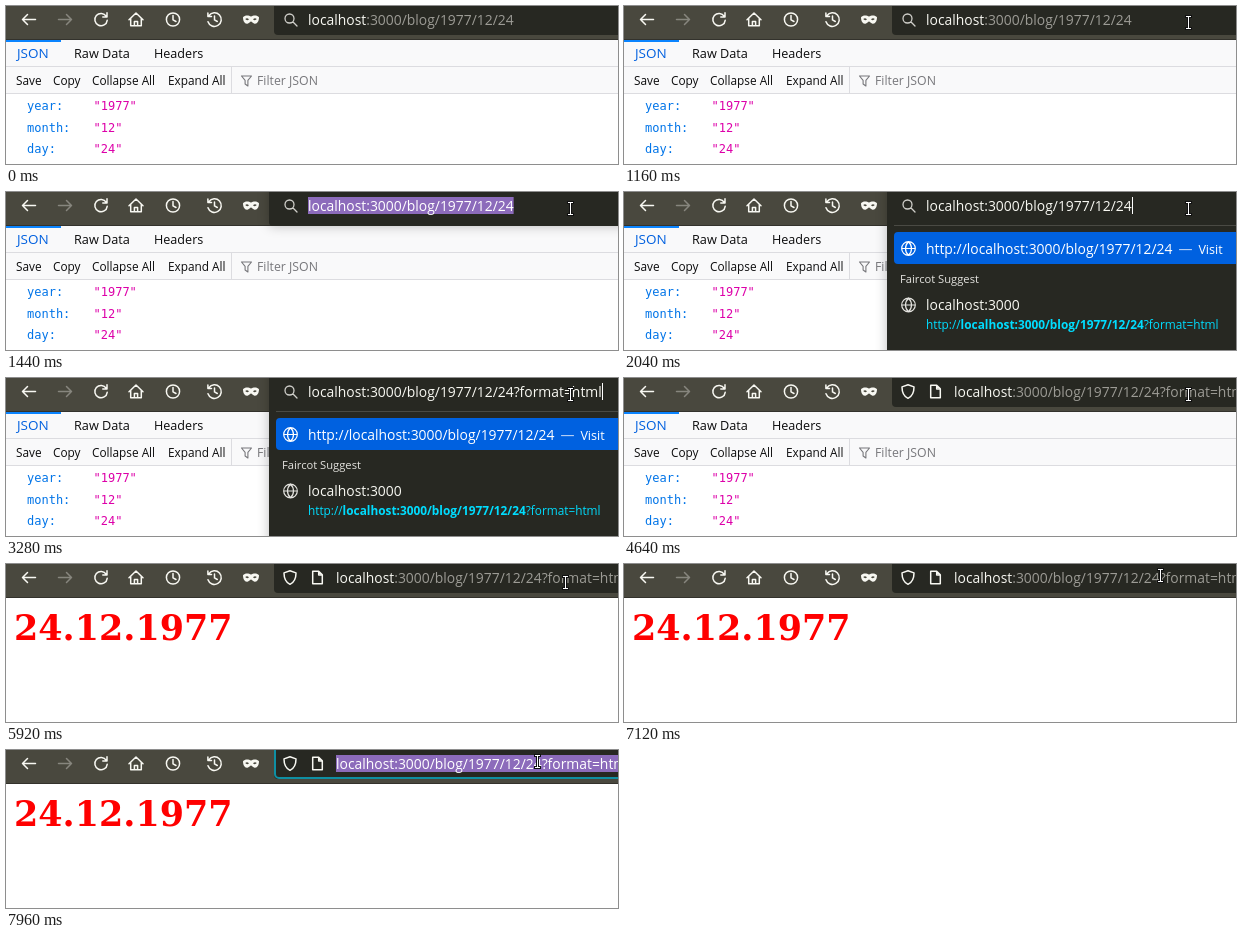
Animation of 612x158 px, one loop 8000 ms. Source, as an HTML page with a canvas:

```html
<!DOCTYPE html>
<html lang="en">
<head>
<meta charset="utf-8">
<title>Blog date route</title>
<style>
html, body { margin: 0; width: 100%; height: 100%; overflow: hidden; background: #fff; }
canvas { display: block; width: 612px; height: 158px; }
</style>
</head>
<body>
<canvas id="stage" width="612" height="158"></canvas>
<script>
const W = 612, H = 158, LOOP = 8000, STEP = 40;
const ctx = document.getElementById('stage').getContext('2d');
const UI = '"Open Sans", "Noto Sans", sans-serif';
const MONO = '"DejaVu Sans Mono", monospace';
const SERIF = '"DejaVu Serif", serif';
const BAR = '#49483e', FIELD = '#272822', EDGE = '#4a4a44';
const LIGHT = '#f8f8f2', DIM = '#9c9b95', INK = '#0c0c0d';
const BLUE = '#0061e0', CYAN = '#00ddff', PURPLE = '#8c6bbb';
const HOST = 'localhost', PATH = ':3000/blog/1977/12/24', QUERY = '?format=html';
const URL_SIZE = 13.9, URL_BASE = 19;

function rect(x, y, w, h, color) {
  ctx.fillStyle = color;
  ctx.fillRect(x, y, w, h);
}

function roundRect(x, y, w, h, r, color) {
  ctx.beginPath();
  ctx.roundRect(x, y, w, h, r);
  ctx.fillStyle = color;
  ctx.fill();
}

// Draws text and returns the x where it ends.
function text(str, x, y, size, color, family = UI, weight = 400) {
  ctx.font = `${weight} ${size}px ${family}`;
  ctx.fillStyle = color;
  ctx.fillText(str, x, y);
  return x + ctx.measureText(str).width;
}

function width(str) {
  ctx.font = `400 ${URL_SIZE}px ${UI}`;
  return ctx.measureText(str).width;
}

function icon(d, x, y, color = LIGHT, line = 1.5, fill = false) {
  const p = new Path2D(d);
  ctx.save();
  ctx.translate(x, y);
  ctx.lineCap = ctx.lineJoin = 'round';
  if (fill) {
    ctx.fillStyle = color;
    ctx.fill(p, 'evenodd');
  } else {
    ctx.strokeStyle = color;
    ctx.lineWidth = line;
    ctx.stroke(p);
  }
  ctx.restore();
}

const ring = r => `M${r} 0A${r} ${r} 0 1 1 ${-r} 0A${r} ${r} 0 1 1 ${r} 0`;
const BACK = 'M6.5 0H-6.5M-1.5 -5L-6.5 0L-1.5 5';
const NEXT = 'M-6.5 0H6.5M1.5 -5L6.5 0L1.5 5';
const RELOAD = 'M5.3 -3.2A6.2 6.2 0 1 0 6.2 .8M6 -6.8V-2.6H1.8';
const HOME = 'M-7 .3L0 -6.5L7 .3M-5.3 -1V6.3H5.3V-1M-1.6 6V2H1.6V6';
const CLOCK = ring(6.6) + 'M0 -4V.3L3 2';
const FORGET = 'M-5.6 -3.8A6.8 6.8 0 1 1 -6.5 2.2M-6.6 -6.6V-3H-3M0 -3.6V.4L2.8 2';
const MASK = 'M-8 -2.2C-6 -5 -2 -4.2 0 -3C2 -4.2 6 -5 8 -2.2C8 2 6 5 3 4C1 3.2 1 2 0 2C-1 2 -1 3.2 -3 4C-6 5 -8 2 -8 -2.2Z' +
  'M-5.8 -.4Q-4 -2.4 -2 -.2Q-4 1.6 -5.8 -.4ZM5.8 -.4Q4 -2.4 2 -.2Q4 1.6 5.8 -.4Z';
const LENS = 'M3 -1.5A4.5 4.5 0 1 1 -6 -1.5A4.5 4.5 0 1 1 3 -1.5M1.8 1.8L6 6';
const SHIELD = 'M0 -6.7L6 -4.6C6 1 4.5 4.6 0 6.8C-4.5 4.6 -6 1 -6 -4.6Z';
const PAGE = 'M-4.8 -6.2H1.2L4.8 -2.6V6.2H-4.8ZM1.2 -6V-2.6H4.6';
const GLOBE = ring(6.8) + 'M-6.8 0H6.8M0 -6.8C-4 -3 -4 3 0 6.8M0 -6.8C4 -3 4 3 0 6.8';
const FUNNEL = 'M-5 -5H5L1.4 -.6V5L-1.4 3V-.6Z';
const TABS = 'M-6.5 -5.5H6.5Q7.5 -5.5 7.5 -4.5V4.5Q7.5 5.5 6.5 5.5H-6.5Q-7.5 5.5 -7.5 4.5V-4.5Q-7.5 -5.5 -6.5 -5.5Z';
const STAR = Array.from({ length: 10 }, (_, i) => {
  const a = i * Math.PI / 5 - Math.PI / 2, r = i % 2 ? 3.7 : 8;
  return `${i ? 'L' : 'M'}${r * Math.cos(a)} ${r * Math.sin(a)}`;
}).join('') + 'Z';

function jsonPage() {
  rect(0, 34, W, 54, '#f9f9fa');
  rect(0, 34, 55, 2, '#0a84ff');
  rect(0, 60, W, 1, '#dcdce0');
  rect(0, 87, W, 1, '#dcdce0');
  text('JSON', 11, 52, 13.5, '#0060df');
  text('Raw Data', 68, 52, 12.7, INK);
  text('Headers', 148, 52, 12.6, INK);
  const tools = [['Save', 10], ['Copy', 47], ['Collapse All', 86], ['Expand All', 162]];
  for (const [label, x] of tools) text(label, x, 79, 11.8, INK);
  rect(225, 61, 1, 26, '#dcdce0');
  icon(FUNNEL, 240.5, 75, '#77777b', 1.1);
  text('Filter JSON', 251, 79, 12.3, '#77777b');
  const rows = [['year:', '"1977"'], ['month:', '"12"'], ['day:', '"24"']];
  rows.forEach(([key, value], i) => {
    const y = Math.round(104 + i * 21.5);
    text(key, 21, y, 12, '#0074e8', MONO);
    text(value, 87.5, y, 12, '#dd00a9', MONO);
  });
}

function toolbar() {
  rect(0, 0, W, 34, BAR);
  rect(0, 33, W, 1, '#33322c');
  icon(BACK, 23, 13.5);
  icon(NEXT, 59, 13.5, '#87867e');
  icon(RELOAD, 95, 13.5);
  icon(HOME, 130, 13.5);
  icon(CLOCK, 167, 13.5);
  icon(FORGET, 208.5, 13.5);
  icon(MASK, 245, 13.5, LIGHT, 1, true);
}

function selection(x, str) {
  rect(x, 5, width(str), 17, PURPLE);
  text(str, x, URL_BASE, URL_SIZE, '#fff');
}

function closedField(loaded, focused) {
  roundRect(268, -6, 360, 35, 4, FIELD);
  if (focused) {
    ctx.beginPath();
    ctx.roundRect(269, -6, 360, 34, 4);
    ctx.strokeStyle = '#0f8fa3';
    ctx.lineWidth = 2;
    ctx.stroke();
  }
  let x = 302;
  if (loaded) {
    icon(SHIELD, 284, 13.5);
    icon(PAGE, 311.5, 13.5);
    x = 330;
  } else {
    icon(LENS, 285, 14, '#d0cfca', 1.3);
  }
  if (focused) return selection(x, HOST + PATH + QUERY);
  x = text(HOST, x, URL_BASE, URL_SIZE, LIGHT);
  text(PATH + (loaded ? QUERY : ''), x, URL_BASE, URL_SIZE, DIM);
}

function suggestions() {
  text('Faircot Suggest', 276, 91, 11.2, '#e4e3df');
  icon(GLOBE, 284.5, 113, '#e4e3df', 1.2);
  text(HOST + ':3000', 302, 118, URL_SIZE, LIGHT);
  let x = text('http://', 302, 137, 11.8, CYAN);
  x = text(HOST + PATH, x, 137, 11.85, CYAN, UI, 700);
  text(QUERY, x, 137, 11.8, CYAN);
}

function engines() {
  rect(263, 78, W, 1, EDGE);
  text('This time, search with:', 276, 108, 13.6, LIGHT);
  icon(ring(7.8), 448, 103, '#de5833', 1, true);
  icon(STAR, 488, 103, CYAN, 1, true);
  icon(TABS, 528, 103, '#dddcd8', 1.3);
  icon(CLOCK, 567.5, 103, '#dddcd8', 1.3);
}

function openField(t) {
  const searching = t >= 3480;
  const bottom = t < 1480 ? 34 : t < 1520 ? 78 : searching ? 127 : 180;
  ctx.save();
  ctx.shadowColor = 'rgba(0,0,0,.25)';
  ctx.shadowBlur = 12;
  roundRect(263, -10, 380, bottom + 10, 4, FIELD);
  ctx.restore();

  icon(LENS, 285, 14, '#d0cfca', 1.3);
  const url = HOST + PATH + (t >= 3280 ? QUERY : '');
  if (t < 2040) selection(302, url);
  else text(url, 302, URL_BASE, URL_SIZE, LIGHT);
  const caret = (t >= 2040 && t < 2640) || (t >= 3280 && t < 3840);
  if (caret) rect(Math.round(302 + width(url)), 5, 1, 17, '#fff');

  if (t < 1480) return;
  rect(270, 33, W, 1, EDGE);
  roundRect(270, 40, 360, 32, 4, BLUE);
  icon(GLOBE, 284.5, 56.5, '#fff', 1.2);
  const x = text('http://' + HOST + PATH + (t >= 3320 ? QUERY : ''), 302, 62, URL_SIZE, '#fff');
  if (t < 3320) {
    text('—', x + 6, 62, 14, '#b8d2f6');
    text('Visit', x + 26, 62, 12.6, '#fff');
  } else {
    const fade = ctx.createLinearGradient(592, 0, 618, 0);
    fade.addColorStop(0, 'rgba(0,97,224,0)');
    fade.addColorStop(1, BLUE);
    rect(592, 42, 20, 28, fade);
  }
  if (t < 1520) return;
  if (searching) engines();
  else suggestions();
}

// Pointer path: time, x, y
const TRACK = [
  [600, 528, 168], [720, 540, 104], [840, 558, 34], [960, 564, 15],
  [1120, 564, 15], [1160, 564, 16], [5880, 564, 16], [5920, 559, 18],
  [6080, 538, 28], [6240, 512, 22], [6400, 532, 12], [6560, 554, 10],
  [6840, 554, 10], [6880, 542, 10], [7000, 542, 10], [7120, 536, 11],
  [7360, 536, 11], [7600, 532, 49], [7760, 532, 49], [7960, 531, 11], [8000, 531, 11]
];

function textCursor(x, y) {
  const parts = [[x - 2, y - 6, 5, 1], [x, y - 6, 1, 13], [x - 2, y + 6, 5, 1]];
  for (const [px, py, w, h] of parts) rect(px - 1, py - 1, w + 2, h + 2, '#111');
  for (const part of parts) rect(...part, '#fff');
}

function pointer(t) {
  if (t < 640) return;
  const i = TRACK.findIndex(p => p[0] > t);
  const [t0, x0, y0] = TRACK[i - 1], [t1, x1, y1] = TRACK[i];
  const k = (t - t0) / (t1 - t0);
  const x = Math.round(x0 + (x1 - x0) * k), y = Math.round(y0 + (y1 - y0) * k);
  if (y < 31) return textCursor(x, y);
  const arrow = 'M0 0V13L3 10.2L5.2 15L7.3 14L5.1 9.5H9.4Z';
  icon(arrow, x, y, '#fff', 2);
  icon(arrow, x, y, '#111', 1, true);
}

function draw(t) {
  rect(0, 0, W, H, '#fff');
  if (t < 4680) jsonPage();
  else if (t >= 4760) text('24.12.1977', 8, 76, 34.9, '#f00', SERIF, 700);
  toolbar();
  if (t >= 1440 && t < 4640) openField(t);
  else closedField(t >= 4640, t >= 7320);
  pointer(t);
}

const start = performance.now();
function tick() {
  const t = (performance.now() - start) % LOOP;
  draw(Math.floor(t / STEP) * STEP);
  requestAnimationFrame(tick);
}
tick();
</script>
</body>
</html>
```
